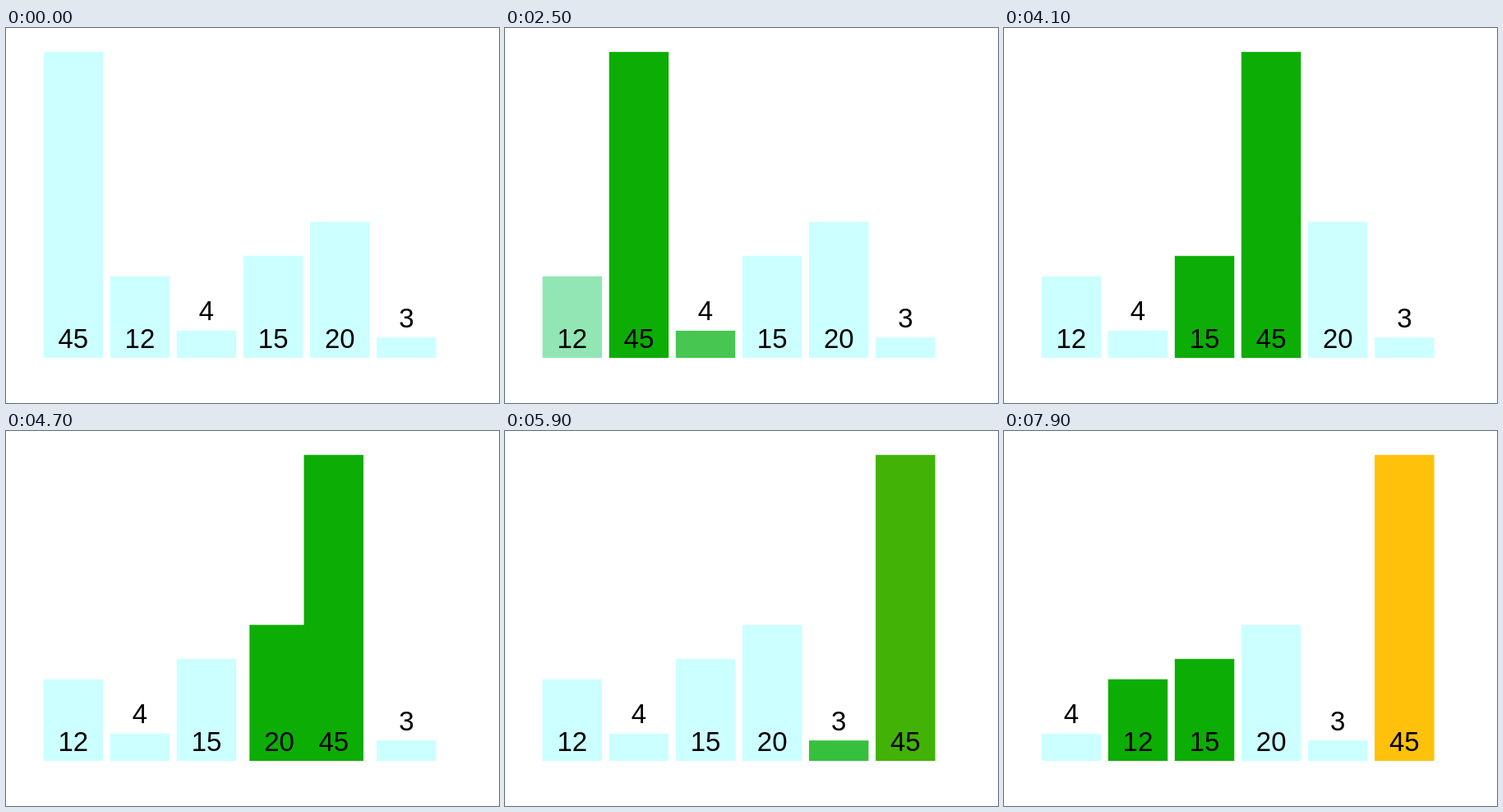
An HTML page that plays this animation: 600x457 px, repeating every 8000 ms.

```html
<!DOCTYPE html>
<html lang="en">
<head>
<meta charset="utf-8">
<title>Bubble sort</title>
<style>
  html, body { margin: 0; width: 100%; height: 100%; overflow: hidden; background: #fff; }
  svg { display: block; width: 600px; height: 457px; }
  text { font: 33px "Liberation Sans", Arial, sans-serif; text-anchor: middle; }
</style>
</head>
<body>
<svg viewBox="0 0 600 457"><g id="bars"></g><g id="labels"></g></svg>
<script>
const LOOP = 8000, FADE = 250, SWAP_DELAY = 262, SWAP = 500, STEP = 862;
const LEFT = 45.6, PITCH = 81.1, WIDTH = 72.5, BASE = 402, UNIT = 8.285;
const IDLE = [204, 255, 255], ACTIVE = [12, 173, 5], SORTED = [255, 193, 10];
const PASSES = [{ start: 1495, steps: 5 }, { start: 6760, steps: 2 }];

function add(parent, tag, attrs) {
  const node = document.createElementNS("http://www.w3.org/2000/svg", tag);
  for (const name in attrs) node.setAttribute(name, attrs[name]);
  return document.getElementById(parent).appendChild(node);
}

const bars = [45, 12, 4, 15, 20, 3].map((value, slot) => {
  const height = value * UNIT, top = BASE - height;
  const label = add("labels", "text", { y: (height < 50 ? top : BASE) - 12.5 });
  label.textContent = value;
  return {
    value, slot: [slot], fill: IDLE, label, tweens: [],
    rect: add("bars", "rect", { y: top, width: WIDTH, height })
  };
});

function tween(bar, prop, to, start, duration) {
  bar.tweens.push({ prop, from: bar[prop], to, start, duration });
  bar[prop] = to;
}

// Run the sort once and record every fade and move.
function schedule() {
  const order = [...bars];
  for (const { start, steps } of PASSES) {
    let pair = [];
    for (let i = 0; i < steps; i++) {
      const time = start + i * STEP, next = [order[i], order[i + 1]];
      for (const bar of pair) if (!next.includes(bar)) tween(bar, "fill", IDLE, time, FADE);
      for (const bar of next) if (!pair.includes(bar)) tween(bar, "fill", ACTIVE, time, FADE);
      pair = next;
      const [a, b] = next;
      if (a.value > b.value) {
        tween(a, "slot", [i + 1], time + SWAP_DELAY, SWAP);
        tween(b, "slot", [i], time + SWAP_DELAY, SWAP);
        order[i] = b;
        order[i + 1] = a;
      }
    }
    if (steps === bars.length - 1) {
      const end = start + steps * STEP;
      tween(order[steps - 1], "fill", IDLE, end, FADE);
      tween(order[steps], "fill", SORTED, end, FADE);
    }
  }
}

const cubicInOut = u => u < 0.5 ? 4 * u ** 3 : 1 - 4 * (1 - u) ** 3;

function render(time) {
  bars.forEach((bar, i) => {
    const state = { slot: [i], fill: IDLE };
    for (const { prop, from, to, start, duration } of bar.tweens) {
      if (time < start) continue;
      const k = cubicInOut(Math.min(1, (time - start) / duration));
      state[prop] = from.map((v, n) => v + (to[n] - v) * k);
    }
    const x = LEFT + PITCH * state.slot[0];
    bar.rect.setAttribute("x", x);
    bar.rect.setAttribute("fill", `rgb(${state.fill.map(Math.round)})`);
    bar.label.setAttribute("x", x + WIDTH / 2);
  });
}

schedule();
const begin = performance.now();
function frame() {
  render((performance.now() - begin) % LOOP);
  requestAnimationFrame(frame);
}
frame();
</script>
</body>
</html>
```
